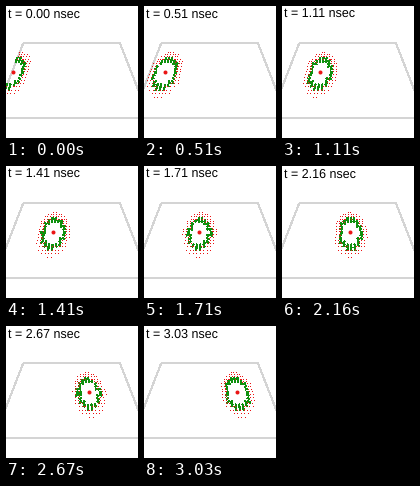
Animation of 132 by 132 pixels, one loop 3.06 s. Source, as a matplotlib script:

```python
import numpy as np
import matplotlib
import matplotlib.pyplot as plt
from matplotlib.animation import FuncAnimation
from matplotlib.collections import LineCollection

matplotlib.rcParams["text.hinting"] = "none"

SIZE, FRAMES, STEP = 132, 102, 30
RED, GREEN, GREY = "#ea1414", "#0e900e", "#d4d4d4"
MID_X, MID_Y, HORIZON, DEPTH = 65.6, 66.25, -87, 123.3
HALF_W, HALF_D = 59.7, 28.5
PITCH_U, PITCH_V = 3.0, 2.2
INNER, WALL, OUTER, STRETCH = 7.6, 11.0, 16.8, 1.07


def project(u, v):
    """Perspective view of the floor; v runs away from the viewer."""
    s = 1 / (1 + v / DEPTH)
    return np.stack([MID_X + u * s, HORIZON + (MID_Y - HORIZON) * s], axis=-1)


fig = plt.figure(figsize=(SIZE / 72, SIZE / 72), dpi=72, facecolor="white")
ax = fig.add_axes([0, 0, 1, 1])
ax.set(xlim=(0, SIZE), ylim=(SIZE, 0))
ax.axis("off")

corners = project(np.array([-1, 1, 1, -1, -1]) * HALF_W,
                  np.array([-1, -1, 1, 1, -1]) * HALF_D)
ax.plot(*corners.T, color=GREY, lw=1, antialiased=False, zorder=1)

spikes = LineCollection([], colors=GREEN, linewidths=1.1,
                        antialiaseds=False, zorder=2)
ax.add_collection(spikes, autolim=False)
dots, = ax.plot([], [], ",", color=RED, antialiased=False, zorder=3)
core, = ax.plot([], [], "o", color=RED, ms=4, mew=0, zorder=4)
label = ax.text(1.7, 12, "", family="Liberation Sans", size=12.5, va="baseline")

U, V = np.meshgrid(np.arange(-HALF_W, HALF_W + 1, PITCH_U),
                   np.arange(-10, 11) * PITCH_V)
U, V = U.ravel(), V.ravel()


def draw(i):
    t = i * STEP / 1000
    cu = -58.8 + 86 * t / 3.03
    du, dv = U - cu, V / STRETCH
    r = np.hypot(du, dv)

    wall = (r > INNER) & (r < WALL)
    reach = 2.2 / r[wall]
    u, v = U[wall], V[wall]
    tip = project(u + du[wall] * reach, v + dv[wall] * reach)
    spikes.set_segments(np.stack([project(u, v), tip], axis=1))

    outer = (r >= WALL) & (r < OUTER)
    points = np.concatenate([project(U[outer], V[outer]), tip[::2]])
    dots.set_data(*points.T)

    x, y = project(cu, 0)
    core.set_data([x], [y])
    label.set_text(f"t = {t:.2f} nsec")
    return spikes, dots, core, label


anim = FuncAnimation(fig, draw, frames=FRAMES, interval=STEP,
                     repeat=True, repeat_delay=0, blit=False)
plt.show()
```
